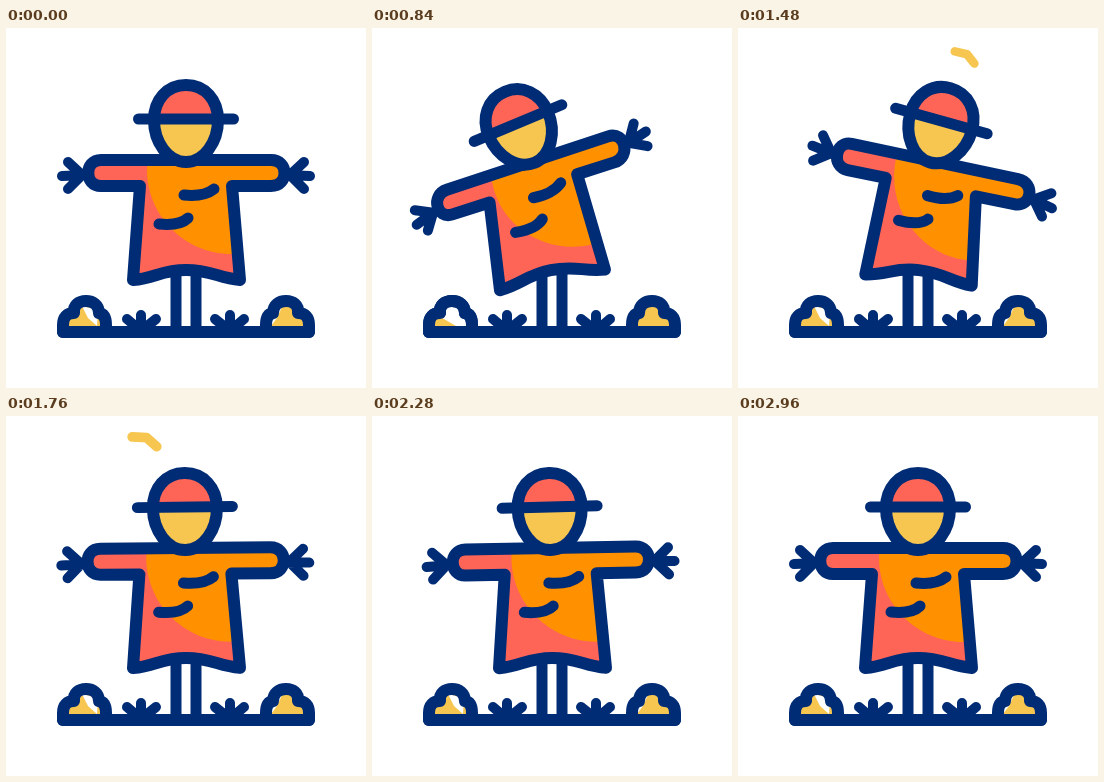
Animation, 360 px wide and 360 px high, one loop 3000 ms. Source, as an HTML page with a canvas:

```html
<!DOCTYPE html>
<html lang="en">
<head>
<meta charset="utf-8">
<title>Scarecrow</title>
<style>
html, body { margin: 0; width: 100%; height: 100%; overflow: hidden; background: #fff; }
canvas { display: block; width: 360px; height: 360px; }
</style>
</head>
<body>
<canvas id="stage"></canvas>
<script>
const NAVY = '#002c76', CORAL = '#ff6557', ORANGE = '#ff9000', YELLOW = '#f6c650';
const LOOP = 3000, STEP = 40;

const canvas = document.getElementById('stage');
const ctx = canvas.getContext('2d');
const dpr = window.devicePixelRatio || 1;
canvas.width = canvas.height = 360 * dpr;

// Damped swing: [time, head tilt in degrees]
const SWING = [[0, 0], [240, 0], [790, -23.3], [1420, 16.3], [2000, -10.6], [2520, 5.5], [2960, 0], [3000, 0]];

const SHIRT = 'M95 132 L265 132 C283 132 283 158 265 158 L226 158 L234 252 C212 250 205 242 180 242 C155 242 150 250 127 252 L134 158 L95 158 C78 158 78 132 95 132 Z';
const PATCH = 'M141 142 C141 96 179 58 225 58 C271 58 309 96 309 142 C309 188 271 226 225 226 C179 226 141 188 141 142 Z';
const FOLDS = 'M178 167 Q198 169 208 161 M153 196 Q174 198 182 190';
const HAND = 'M82 147 L56 148 M76 147 L62 134 M76 147 L62 161';
const HEAD = new Path2D('M180 57 C199 57 212 72 212 92 C212 114 198 134 180 134 C162 134 148 114 148 92 C148 72 161 57 180 57 Z');
const MOUND = new Path2D('M57 304 V297 C57 289 61 285 68 285 C67 277 73 273 80 273 C87 273 93 277 93 285 C98 286 100 290 100 297 V304');
const GRASS = new Path2D('M135 303 L121 291 M135 303 V287 M135 303 L150 291');

const rad = deg => deg * Math.PI / 180;

function tiltAt(t) {
  const i = SWING.findIndex(k => k[0] > t);
  const [t0, a0] = SWING[i - 1], [t1, a1] = SWING[i];
  return a0 + (a1 - a0) * (1 - Math.cos(Math.PI * (t - t0) / (t1 - t0))) / 2;
}

// Bends the body: shift and turn grow with the height above the hem.
function bender(a) {
  const base = a * (0.15 + 0.015 * Math.abs(a));
  return (x, y) => {
    const h = Math.max(0, (250 - y) / 159);
    const turn = rad(base + (a - base) * Math.min(h, 0.62));
    const u = x - 180;
    return [180 + 1.5 * a * h ** 1.1 + u * Math.cos(turn), y + 0.008 * a * a * h + u * Math.sin(turn)];
  };
}

function mapPath(d, fn) {
  return new Path2D(d.replace(/([\d.]+) ([\d.]+)/g, (_, x, y) =>
    fn(+x, +y).map(v => v.toFixed(2)).join(' ')));
}

function stroke(path, width = 11, color = NAVY) {
  ctx.lineWidth = width;
  ctx.strokeStyle = color;
  ctx.stroke(path);
}

function fill(path, color) {
  ctx.fillStyle = color;
  ctx.fill(path);
}

function flipped(draw) {
  ctx.save();
  ctx.translate(360, 0);
  ctx.scale(-1, 1);
  draw();
  ctx.restore();
}

function mound(color, gleam) {
  fill(MOUND, color);
  if (gleam) fill(gleam, '#fff');
  stroke(MOUND, 12);
}

const LEFT_GLEAM = new Path2D('M76 278 L92 282 L91 298 L82 290 Z');
const RIGHT_GLEAM = new Path2D('M84 279 L95 284 L95 298 L89 290 Z');
const LOW_CORNER = new Path2D('M62 287 L72 291 L84 298 L62 298 Z');

function ground(a) {
  const pale = a < -2;
  mound(pale ? '#fff' : YELLOW, pale ? null : LEFT_GLEAM);
  if (a < -15) {
    fill(LOW_CORNER, YELLOW);
    stroke(MOUND, 12);
  }
  flipped(() => mound(YELLOW, pale ? null : RIGHT_GLEAM));
  stroke(new Path2D('M57 304 H303'), 12);
  stroke(GRASS, 10);
  flipped(() => { ctx.translate(1, 0); stroke(GRASS, 10); });
  stroke(new Path2D('M170 240 V304 M190 240 V304'));
}

function hands(a, bend) {
  for (const side of [-1, 1]) {
    const r = rad(a * 0.8), c = Math.cos(r), s = Math.sin(r);
    const wrist = 180 + side * 96;
    stroke(mapPath(HAND, (x, y) => {
      const u = (side < 0 ? x : 360 - x) - wrist, v = y - 147;
      return bend(wrist + u * c - v * s, 147 + u * s + v * c);
    }), 10);
  }
}

function body(a) {
  const bend = bender(a);
  const shirt = mapPath(SHIRT, bend);
  hands(a, bend);
  fill(shirt, CORAL);
  ctx.save();
  ctx.clip(shirt);
  fill(mapPath(PATCH, bend), ORANGE);
  ctx.restore();
  stroke(shirt, 12);
  stroke(mapPath(FOLDS, bend));

  ctx.save();
  ctx.translate(...bend(180, 91));
  ctx.rotate(rad(a));
  ctx.translate(-180, -91);
  fill(HEAD, YELLOW);
  ctx.save();
  ctx.clip(HEAD);
  ctx.fillStyle = CORAL;
  ctx.fillRect(140, 50, 80, 41);
  ctx.restore();
  stroke(HEAD, 12);
  stroke(new Path2D('M132.5 91 H227.5'));
  ctx.restore();
}

function bird(t) {
  if (t < 1200 || t > 2120) return;
  const p = (t - 1480) / 560;
  ctx.save();
  ctx.translate(227 - 177 * p, 33 - 16 * Math.cos(2 * Math.PI * (t - 1640) / 840));
  ctx.rotate(rad(20 - 20 * p));
  const s = 0.78 + 0.22 * p;
  ctx.scale(s, s);
  stroke(new Path2D('M-14 0 L2 -2 L15 6'), 11, YELLOW);
  ctx.restore();
}

function frame() {
  const t = Math.floor(performance.now() % LOOP / STEP) * STEP;
  const a = tiltAt(t);
  ctx.setTransform(dpr, 0, 0, dpr, 0, 0);
  ctx.fillStyle = '#fff';
  ctx.fillRect(0, 0, 360, 360);
  ctx.lineCap = ctx.lineJoin = 'round';
  bird(t);
  ground(a);
  body(a);
  requestAnimationFrame(frame);
}
frame();
</script>
</body>
</html>
```
